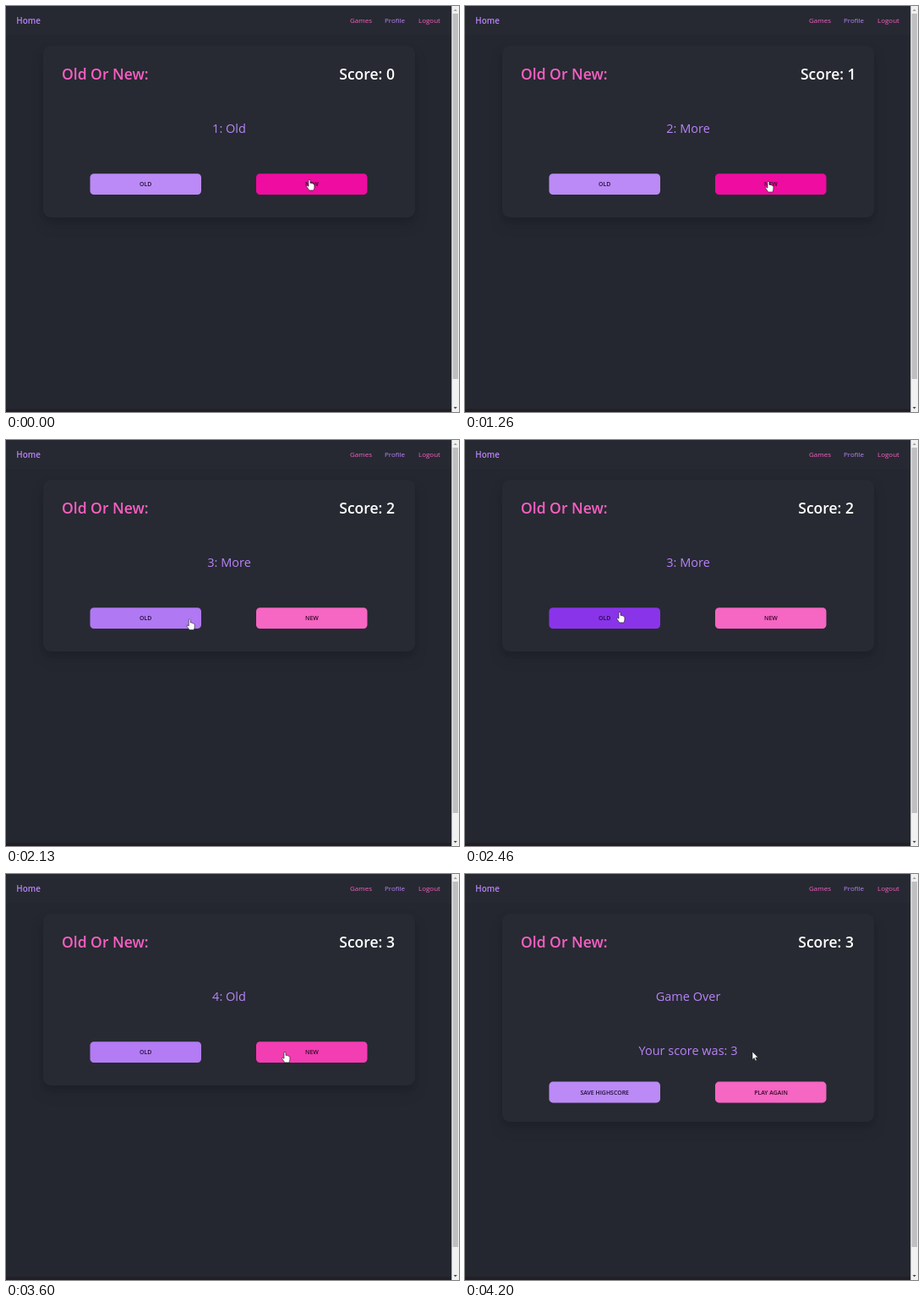
Recreate the animation shown at these times as an HTML page. Size 536x480 px, loop 5.26 s.

```html
<!DOCTYPE html>
<html lang="en">
<head>
<meta charset="utf-8">
<title>Old Or New</title>
<style>
  html, body { margin: 0; width: 100%; height: 100%; overflow: hidden; background: #24272f; }
  svg { display: block; font-family: "Open Sans", "Noto Sans", sans-serif; }
  .pink { fill: #f85fc3; }
  .purple { fill: #b983fa; }
  .nav { font-size: 8px; }
  .home { font-size: 9.9px; font-weight: 600; }
  .title { font-size: 17.5px; font-weight: 600; }
  .line { font-size: 14.5px; text-anchor: middle; }
  .label { font-size: 6.95px; font-weight: 600; text-anchor: middle; }
  #card { fill: #272a32; filter: drop-shadow(0 3px 3px rgba(0,0,0,.06)) drop-shadow(0 9px 7px rgba(18,16,36,.22)); }
  .cursor { fill: #fff; stroke: #15161c; stroke-width: .6; stroke-linejoin: round; }
</style>
</head>
<body>
<svg width="536" height="480" viewBox="0 0 536 480">
  <rect width="536" height="480" fill="#24272f"/>
  <rect width="527" height="34" fill="#262931"/>
  <rect y="476.5" width="527" height="3.5" fill="#221e28"/>
  <text class="home purple" x="12.3" y="21">Home</text>
  <text class="nav pink" x="407" y="20">Games</text>
  <text class="nav purple" x="448" y="20">Profile</text>
  <text class="nav pink" x="488" y="20">Logout</text>

  <rect id="card" x="44" y="47" width="440" height="203" rx="9"/>
  <text class="title pink" x="66" y="86.8">Old Or New:</text>
  <text class="title" id="score" y="86.8" fill="#fff"></text>
  <text class="line purple" id="question" x="264" y="150"></text>
  <text class="line purple" id="result" x="264" y="214">Your score was: 3</text>

  <g id="buttons">
    <rect id="oldButton" x="99.5" y="198.2" width="131.5" height="24.8" rx="4.5"/>
    <rect id="newButton" x="296" y="198.2" width="131.5" height="24.8" rx="4.5"/>
    <text class="label" id="oldLabel" x="165.2" y="213.2" fill="#1e0d38"></text>
    <text class="label" id="newLabel" x="362" y="213.2" fill="#350826"></text>
  </g>

  <rect x="527.3" width="8.7" height="480" fill="#f1f1f1"/>
  <rect x="528.6" y="9" width="6.4" height="432" fill="#bfbfc1"/>
  <path d="M529.6 6l2.1-2.6 2.1 2.6z" fill="#a3a3a3"/>
  <path d="M529.6 474l2.1 2.6 2.1-2.6z" fill="#505050"/>

  <path id="arrow" class="cursor" d="M0 0V9.6L2.2 7.5L3.7 10.9L5.3 10.2L3.8 6.9H6.9Z"/>
  <path id="hand" class="cursor" d="M-1 .9Q0-.6 1 .9V4.4Q2.3 3.8 2.9 4.8Q4 4.4 4.5 5.4Q5.9 5.2 5.9 6.7V9.2Q5.9 11 4.9 12.9H-.3Q-1.2 11-3.2 8.7Q-3.8 7.2-2.3 7.2L-1 8.3Z"/>
</svg>
<script>
const LOOP = 5260, FADE = 200, GAME_OVER = 4000;
const $ = id => document.getElementById(id);
const clamp = v => Math.max(0, Math.min(1, v));

// Cursor tip: [time, x, y]
const path = [
  [0, 359, 205], [330, 359, 205], [660, 359, 207], [1640, 359, 207],
  [1730, 345, 244], [2300, 183, 203], [2460, 183, 203], [2730, 182, 203],
  [3330, 182, 203], [3600, 330, 210], [3800, 340, 210], [LOOP, 340, 210]
];
// Question changes: [time, text, score]
const rounds = [
  [0, "1: Old", 0], [330, "2: More", 1], [1330, "3: More", 2],
  [2730, "4: Old", 3], [GAME_OVER, "Game Over", 3]
];
const hovers = {
  old: [[2090, 3435]],
  new: [[-FADE, 1680], [3510, GAME_OVER]]
};

function cursorAt(t) {
  const i = path.findIndex(p => p[0] > t);
  const [t0, x0, y0] = path[i - 1], [t1, x1, y1] = path[i];
  const u = (t - t0) / (t1 - t0), k = u * u * (3 - 2 * u);
  return [x0 + (x1 - x0) * k, y0 + (y1 - y0) * k];
}

const isOver = (name, t) => hovers[name].some(([a, b]) => t >= a && t < b);

const hoverLevel = (name, t) => Math.max(...hovers[name].map(
  ([a, b]) => Math.min(clamp((t - a) / FADE), clamp(1 - (t - b) / FADE))));

const mix = (from, to, k) =>
  `rgb(${from.map((c, i) => Math.round(c + (to[i] - c) * k))})`;

function draw(t) {
  const over = t >= GAME_OVER;
  const [, question, score] = rounds.filter(r => r[0] <= t).pop();
  $("question").textContent = question;
  $("score").textContent = "Score: " + score;
  $("score").setAttribute("x", score === 1 ? 397 : 394.3);
  $("result").style.display = over ? "" : "none";

  $("card").setAttribute("height", over ? 246 : 203);
  $("buttons").setAttribute("transform", `translate(0 ${over ? 47.4 : 0})`);
  $("oldLabel").textContent = over ? "SAVE HIGHSCORE" : "OLD";
  $("newLabel").textContent = over ? "PLAY AGAIN" : "NEW";
  $("oldButton").style.fill = mix([187, 138, 246], [138, 52, 234], hoverLevel("old", t));
  $("newButton").style.fill = mix([246, 102, 195], [239, 12, 160], hoverLevel("new", t));

  const pointing = isOver("old", t) || isOver("new", t);
  const place = `translate(${cursorAt(t)})`;
  for (const [id, shown] of [["hand", pointing], ["arrow", !pointing]]) {
    $(id).style.display = shown ? "" : "none";
    $(id).setAttribute("transform", place);
  }
}

const start = performance.now();
function tick() {
  draw((performance.now() - start) % LOOP);
  requestAnimationFrame(tick);
}
tick();
</script>
</body>
</html>
```
